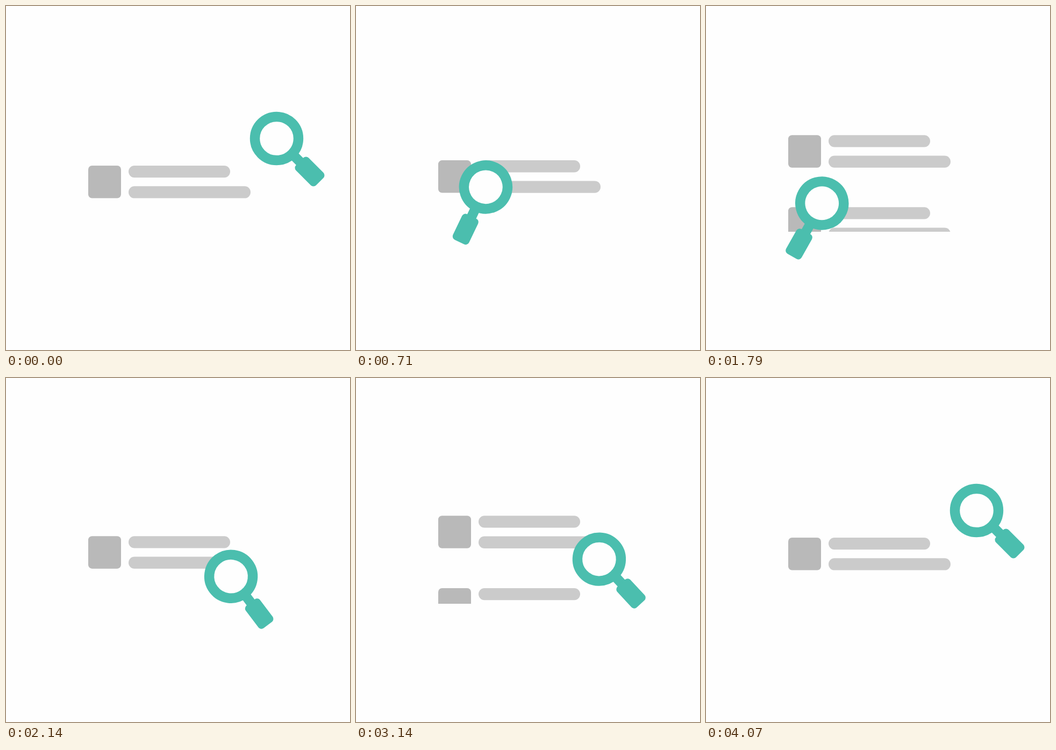
An HTML page that plays this animation: 640 by 640 pixels, repeating every 4.14 s.

```html
<!DOCTYPE html>
<html lang="en">
<head>
<meta charset="utf-8">
<title>Searching a list</title>
<style>
  html, body { margin: 0; width: 100%; height: 100%; overflow: hidden; background: #fefefe; }
  svg { display: block; width: 100vw; height: 100vh; }
</style>
</head>
<body>
<svg viewBox="0 0 640 640">
  <defs>
    <clipPath id="window"><rect x="140" y="217" width="330" height="203"/></clipPath>
    <g id="row">
      <rect x="153" width="61" height="60.5" rx="7" fill="#b9b9b9"/>
      <g fill="#cbcbcb">
        <rect x="228" width="189" height="22.3" rx="11"/>
        <rect x="228" y="38.3" width="227" height="22.3" rx="11"/>
      </g>
    </g>
    <path id="star" d="M0-10Q2-2 10 0Q2 2 0 10Q-2 2-10 0Q-2-2 0-10Z"
          fill="#f9c04f" stroke="#f9c04f" stroke-width="5" stroke-linejoin="round"/>
  </defs>
  <g clip-path="url(#window)">
    <use id="leaving" href="#row"/>
    <use id="entering" href="#row"/>
  </g>
  <use class="spark" href="#star"/>
  <use class="spark" href="#star"/>
  <use class="spark" href="#star"/>
  <g id="lens" fill="#4bbeae">
    <rect x="44" y="-9.2" width="24" height="18.4"/>
    <rect x="60.6" y="-16.6" width="52.8" height="33.2" rx="7"/>
    <circle r="40.5" fill="#fefefe" stroke="#4bbeae" stroke-width="18.4"/>
  </g>
</svg>
<script>
const LOOP = 4140, STEP = LOOP / 58;
const REST = 297, ABOVE = 153, BELOW = 431;
const LAG = 6; // the leaving row trails the entering one

// Lens stops: x, y, handle angle
const topRight = [503.5, 246.5, 45];
const left = [162, 373.5, 137];
const right = [433.3, 371, 48];

const moves = [
  { start: 5, end: 1342, from: topRight, to: left, lift: 10 },
  { start: 1342, end: 2475, from: left, to: right, lift: 9.5 },
  { start: 2478, end: 4060, from: right, to: topRight, lift: 0 }
];
const scrolls = [
  { start: 192, end: 962 },
  { start: 1259, end: 2353 },
  { start: 2580, end: 3680 }
];
const sparks = [
  { start: 1110, end: 1760, x: 75, y: 379 },
  { start: 2200, end: 2800, x: 539.5, y: 412.5 },
  { start: 3430, end: 4040, x: 412.5, y: 217.5 }
];

const lensEl = document.getElementById('lens');
const leavingEl = document.getElementById('leaving');
const enteringEl = document.getElementById('entering');
const sparkEls = document.querySelectorAll('.spark');

const mix = (a, b, k) => a + (b - a) * k;
const clamp = k => Math.min(1, Math.max(0, k));
const phase = (t, { start, end }) => clamp((t - start) / (end - start));
const latest = (list, t) => list.filter(item => item.start <= t).pop() || list[0];

// Same curve as cubic-bezier(.8, 0, .1, 1)
function ease(k) {
  let lo = 0, hi = 1;
  for (let i = 0; i < 24; i++) {
    const s = (lo + hi) / 2, r = 1 - s;
    const x = 2.4 * s * r * r + 0.3 * s * s * r + s ** 3;
    if (x < k) lo = s; else hi = s;
  }
  return k <= 0 ? 0 : k >= 1 ? 1 : lo * lo * (3 - 2 * lo);
}

function place(el, x, y, angle = 0) {
  el.setAttribute('transform', `translate(${x} ${y}) rotate(${angle})`);
}

function draw(t) {
  const scroll = latest(scrolls, t);
  place(leavingEl, 0, mix(REST, BELOW, ease(phase(t - LAG, scroll))));
  place(enteringEl, 0, mix(ABOVE, REST, ease(phase(t, scroll))));

  const move = latest(moves, t);
  const k = ease(phase(t, move));
  const [x, y, angle] = move.from.map((v, i) => mix(v, move.to[i], k));
  place(lensEl, x, y - move.lift * 4 * k * (1 - k), angle);

  sparks.forEach((spark, i) => {
    const p = phase(t, spark);
    place(sparkEls[i], spark.x, spark.y, 69 - 85 * p);
    sparkEls[i].setAttribute('opacity', clamp(Math.min(p * 4, (1 - p) * 2)));
  });
}

const begin = performance.now();
function tick() {
  const t = (performance.now() - begin) % LOOP;
  draw(Math.floor((t + 5) / STEP) % 58 * STEP);
  requestAnimationFrame(tick);
}
tick();
</script>
</body>
</html>
```
